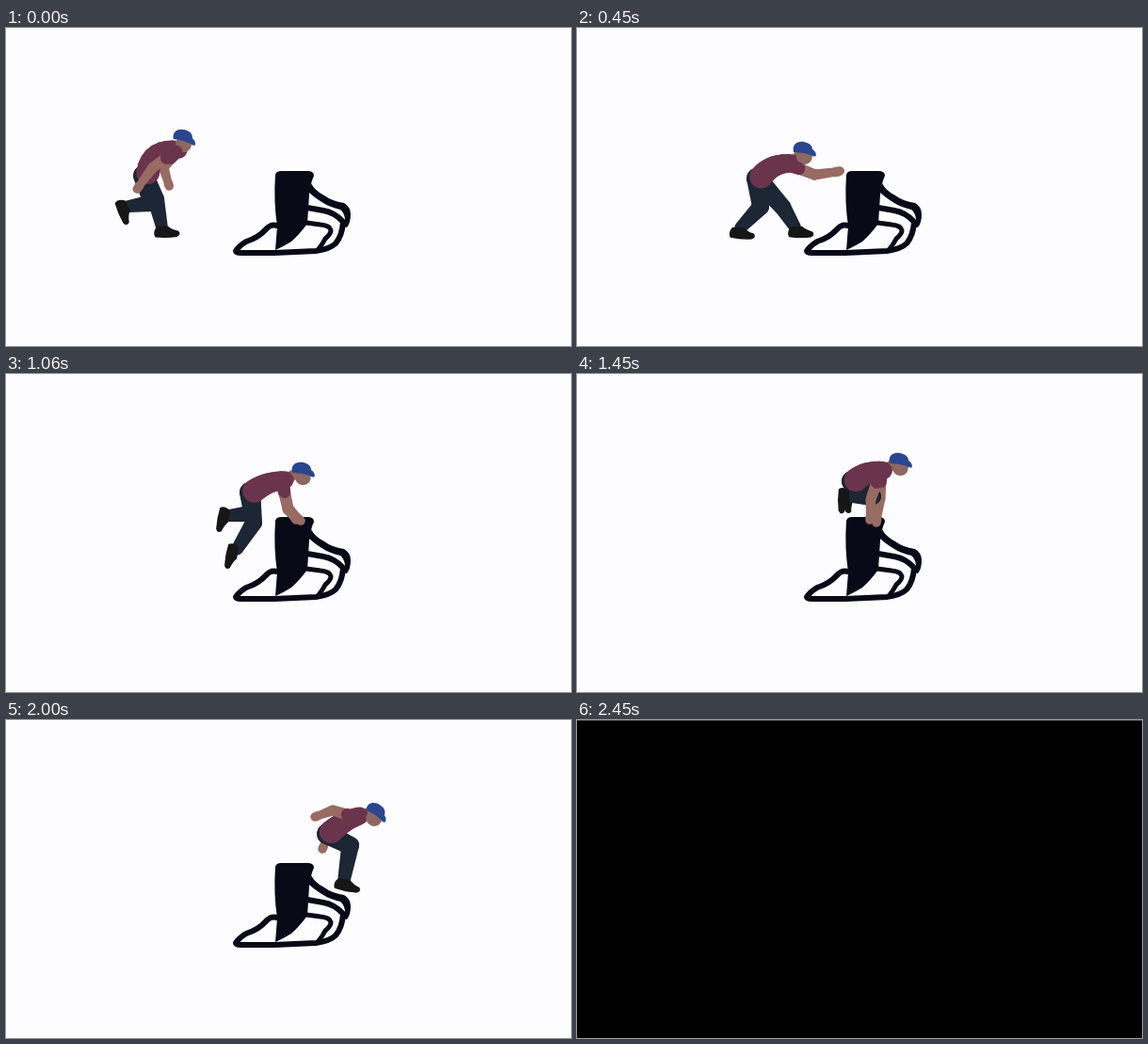
Animation of 600x338 px, one loop 2480 ms. Source, as an HTML page with a canvas:

```html
<!DOCTYPE html>
<html lang="en">
<head>
<meta charset="utf-8">
<title>Vault</title>
<style>
html, body { margin: 0; width: 100%; height: 100%; overflow: hidden; background: #fdfcfe; }
canvas { display: block; }
</style>
</head>
<body>
<canvas id="stage" width="600" height="338"></canvas>
<script>
const ctx = document.getElementById('stage').getContext('2d');
const LOOP = 2480, BLACKOUT = 2450;
const color = {
  paper: '#fdfcfe', ink: '#080a17', shirt: '#6b344d', pants: '#1c2634',
  skin: '#986b63', face: '#8d6860', cap: '#29468e', shoe: '#171616'
};

// Joints are [x, y]; cap and feet add a rotation in degrees; bend arches the back.
const poses = [];
const pose = (time, joints) => poses.push({ time, joints });

pose(0, {
  hip: [146, 157], shoulder: [185, 128], bend: [19], cap: [188, 115, 18],
  elbowN: [156, 148], handN: [139, 171], elbowF: [167, 148], handF: [173, 168],
  kneeN: [159, 182], footN: [166, 214, -4], kneeF: [155, 186], footF: [126, 190, 65]
});
pose(220, {
  hip: [164, 158], shoulder: [206, 136], bend: [14], cap: [212, 121, 16],
  elbowN: [187, 159], handN: [203, 168], elbowF: [214, 160], handF: [232, 163],
  kneeN: [181, 187], footN: [168, 215, 0], kneeF: [193, 184], footF: [180, 207, 20]
});
pose(450, {
  hip: [191, 160], shoulder: [230, 143], bend: [9], cap: [240, 128, 12],
  elbowN: [252, 156], handN: [279, 152], elbowF: [252, 156], handF: [277, 153],
  kneeN: [195, 190], footN: [171, 215, 2], kneeF: [218, 190], footF: [233, 214, -2]
});
pose(700, {
  hip: [208, 151], shoulder: [252, 134], bend: [8], cap: [264, 119, 12],
  elbowN: [278, 151], handN: [307, 154], elbowF: [276, 152], handF: [303, 154],
  kneeN: [226, 183], footN: [200, 203, 45], kneeF: [236, 184], footF: [235, 214, 5]
});
pose(1060, {
  hip: [259, 126], shoulder: [298, 112], bend: [5], cap: [314, 101, 12],
  elbowN: [300, 143], handN: [313, 156], elbowF: [299, 144], handF: [308, 155],
  kneeN: [262, 148], footN: [234, 151, 98], kneeF: [263, 158], footF: [243, 190, 98]
});
pose(1450, {
  hip: [292, 114], shoulder: [327, 102], bend: [6], cap: [342, 91, 12],
  elbowN: [312, 133], handN: [311, 155], elbowF: [322, 132], handF: [318, 158],
  kneeN: [312, 131], footN: [286, 130, 88], kneeF: [314, 130], footF: [289, 129, 73]
});
pose(1700, {
  hip: [315, 112], shoulder: [351, 100], bend: [6], cap: [366, 92, 20],
  elbowN: [335, 117], handN: [316, 123], elbowF: [332, 123], handF: [322, 139],
  kneeN: [342, 130], footN: [309, 143, 20], kneeF: [340, 129], footF: [314, 143, 20]
});
pose(2000, {
  hip: [341, 121], shoulder: [377, 101], bend: [4], cap: [393, 96, 35],
  elbowN: [347, 96], handN: [328, 103], elbowF: [343, 121], handF: [336, 137],
  kneeN: [366, 133], footN: [359, 172, 10], kneeF: [365, 134], footF: [358, 172, 10]
});
pose(2200, {
  hip: [370, 138], shoulder: [397, 104], bend: [3], cap: [413, 100, 28],
  elbowN: [374, 96], handN: [358, 96], elbowF: [364, 125], handF: [355, 140],
  kneeN: [382, 170], footN: [380, 213, 3], kneeF: [387, 171], footF: [388, 212, 3]
});
pose(2300, {
  hip: [383, 143], shoulder: [403, 108], bend: [2], cap: [421, 103, 25],
  elbowN: [387, 96], handN: [373, 93], elbowF: [374, 126], handF: [367, 140],
  kneeN: [382, 180], footN: [381, 214, 0], kneeF: [391, 180], footF: [395, 212, 0]
});
pose(2480, {
  ...poses[poses.length - 1].joints,
  hip: [388, 143], shoulder: [408, 106], cap: [425, 101, 22],
  elbowN: [389, 104], handN: [374, 107], elbowF: [380, 127], handF: [373, 142]
});

// Smooth cubic path through the keys that never overshoots a planted limb.
function sample(key, axis, i, t) {
  const value = k => poses[k].joints[key][axis];
  const slope = k => (value(k + 1) - value(k)) / (poses[k + 1].time - poses[k].time);
  const tangent = k => {
    if (k === 0) return slope(0);
    if (k === poses.length - 1) return slope(k - 1);
    const a = slope(k - 1), b = slope(k);
    return a * b <= 0 ? 0 : 2 * a * b / (a + b);
  };
  const span = poses[i + 1].time - poses[i].time;
  const u = (t - poses[i].time) / span, v = 1 - u;
  return v * v * (1 + 2 * u) * value(i) + u * u * (3 - 2 * u) * value(i + 1)
    + span * u * v * (v * tangent(i) - u * tangent(i + 1));
}

function poseAt(t) {
  let i = 0;
  while (i < poses.length - 2 && t >= poses[i + 1].time) i++;
  const result = {};
  for (const key in poses[0].joints) {
    result[key] = poses[0].joints[key].map((_, axis) => sample(key, axis, i, t));
  }
  return result;
}

const mix = (a, b, k) => [a[0] + (b[0] - a[0]) * k, a[1] + (b[1] - a[1]) * k];

function fillPath(d, fill) {
  ctx.fillStyle = fill;
  ctx.fill(new Path2D(d));
}

function line(d, width) {
  ctx.strokeStyle = color.ink;
  ctx.lineWidth = width;
  ctx.stroke(new Path2D(d));
}

// Tapered capsule between two joints.
function limb(a, b, ra, rb, fill) {
  const angle = Math.atan2(b[1] - a[1], b[0] - a[0]);
  ctx.fillStyle = fill;
  ctx.beginPath();
  ctx.arc(a[0], a[1], ra, angle + Math.PI / 2, angle - Math.PI / 2);
  ctx.arc(b[0], b[1], rb, angle - Math.PI / 2, angle + Math.PI / 2);
  ctx.fill();
}

function placed([x, y, degrees], draw) {
  ctx.save();
  ctx.translate(x, y);
  ctx.rotate(degrees * Math.PI / 180);
  draw();
  ctx.restore();
}

function leg(hip, knee, foot) {
  limb(hip, knee, 11, 9, color.pants);
  limb(knee, mix(foot, knee, .12), 9, 6.5, color.pants);
  placed(foot, () => fillPath('M-6-3Q-11 3-8 8Q4 10 15 9Q20 7 17 3Q10 1 6-3Z', color.shoe));
}

function arm(root, elbow, hand) {
  limb(root, elbow, 6.5, 5.5, color.skin);
  limb(elbow, hand, 5.5, 4, color.skin);
  limb(mix(elbow, hand, .85), hand, 4.8, 4.8, color.skin);
  limb(root, mix(root, elbow, .4), 7.5, 6.5, color.shirt);
}

// Shirt tapering along the curved spine.
function torso(hip, shoulder, bend) {
  const dx = shoulder[0] - hip[0], dy = shoulder[1] - hip[1];
  const length = Math.hypot(dx, dy);
  const start = mix(hip, shoulder, .12), end = mix(hip, shoulder, .95);
  const middle = mix(hip, shoulder, .5);
  const control = [middle[0] + dy / length * bend, middle[1] - dx / length * bend];
  const spine = k => mix(mix(start, control, k), mix(control, end, k), k);
  const radius = k => 12.5 - 3 * k;
  for (let k = 0; k < 1; k += .125) {
    limb(spine(k), spine(k + .125), radius(k), radius(k + .125), color.shirt);
  }
}

function head(cap) {
  placed(cap, () => {
    ctx.fillStyle = color.face;
    ctx.beginPath();
    ctx.ellipse(3, 8.5, 8.5, 8, 0, 0, Math.PI * 2);
    ctx.fill();
    fillPath('M-9 6C-13-2-7-7 0-7C6-7 9-5 10-1Q15 1 15 5Q13 7 9 5Q0 4-9 6Z', color.cap);
  });
}

function runner(t) {
  const p = poseAt(t);
  const root = mix(p.hip, p.shoulder, .87);
  arm(root, p.elbowF, p.handF);
  leg(p.hip, p.kneeF, p.footF);
  leg(p.hip, p.kneeN, p.footN);
  limb(p.shoulder, mix(p.shoulder, p.cap, .7), 6, 5, color.face);
  torso(p.hip, p.shoulder, p.bend[0]);
  head(p.cap);
  arm(root, p.elbowN, p.handN);
}

function obstacle() {
  fillPath('M286 156Q287 152 292 152L320 152Q327 152 327 157Q323 166 322 177L320 208' +
    'Q311 220 303 227Q293 233 286 236L288 211Q284 184 286 156Z', color.ink);
  fillPath('M324 165Q328 173 338 178Q346 184 359 186Q366 190 366 198Q366 207 362 212' +
    'Q357 212 360 203Q359 196 355 193Q343 190 337 186Q327 180 321 174Z', color.ink);
  line('M288 210Q281 208 276 214Q268 223 255 227Q247 232 244 237Q244 239 250 239' +
    'L285 239L329 237Q344 235 350 229Q357 221 358 206Q349 196 337 194L320 191', 6);
  line('M319 207L334 209Q344 210 345 215Q345 219 339 224Q336 230 331 236', 5);
}

function render(t) {
  if (t >= BLACKOUT) {
    ctx.fillStyle = '#000';
    ctx.fillRect(0, 0, 600, 338);
    ctx.fillStyle = '#4c4c4c';
    ctx.fillRect(0, 0, 600, 1);
    return;
  }
  ctx.fillStyle = color.paper;
  ctx.fillRect(0, 0, 600, 338);
  obstacle();
  runner(t);
}

function tick() {
  render(performance.now() % LOOP);
  requestAnimationFrame(tick);
}

ctx.lineCap = ctx.lineJoin = 'round';
tick();
</script>
</body>
</html>
```
